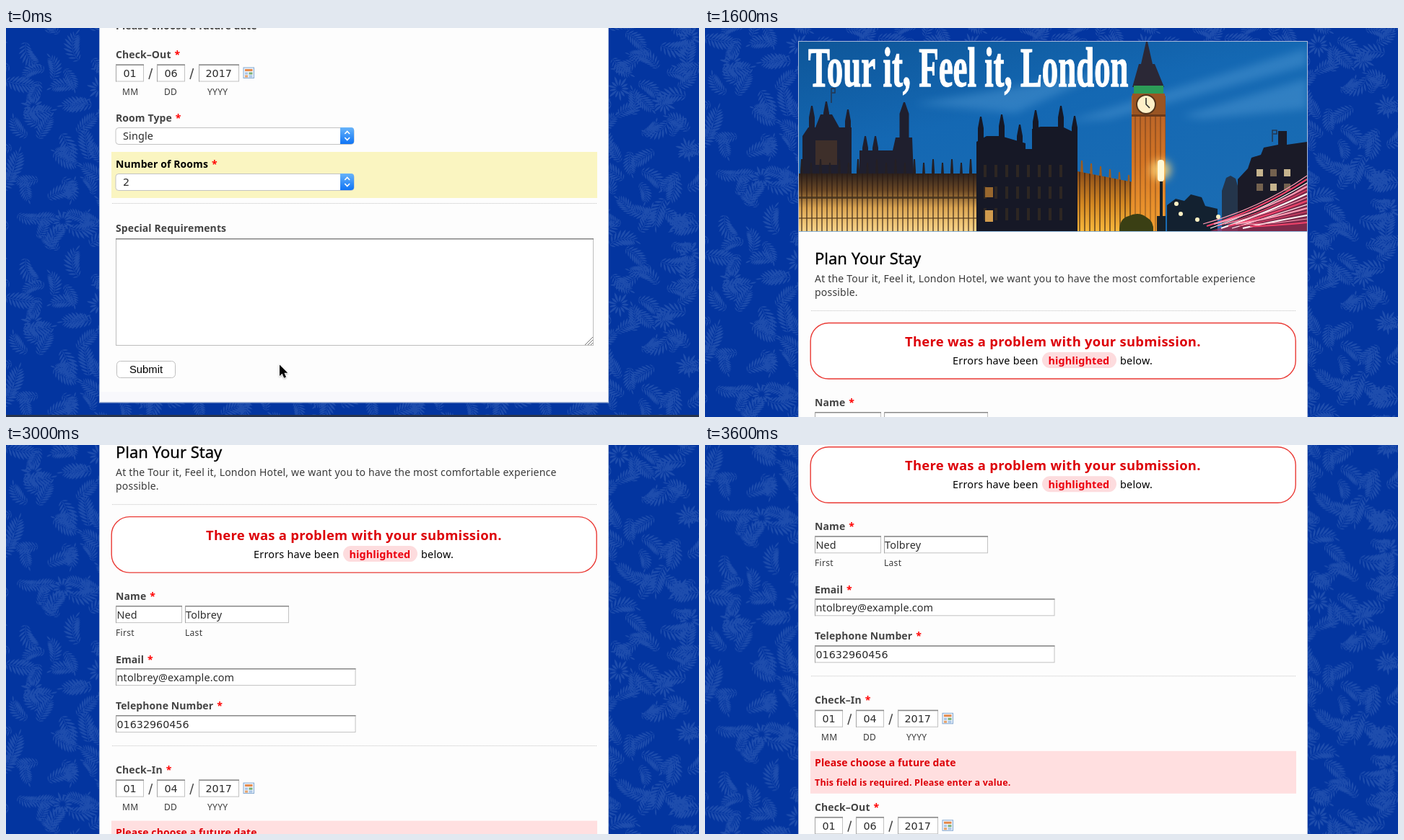
Animation, 960 px wide and 540 px high, one loop 4.8 s. Source, as an HTML page:

```html
<!DOCTYPE html>
<html lang="en">
<head>
<meta charset="utf-8">
<title>Plan Your Stay</title>
<style>
html, body { margin: 0; width: 100%; height: 100%; overflow: hidden; background: #0335a0; }
svg { display: block; }
text { font: 14px "Noto Sans", "Open Sans", sans-serif; letter-spacing: .2px; fill: #3a3a3a; white-space: pre; }
.label { font-weight: bold; letter-spacing: .1px; fill: #444; }
.dark { fill: #000; }
.req { fill: #f00; }
.title { font-size: 22px; letter-spacing: 0; fill: #000; stroke: #000; stroke-width: .3px; }
.value { font-size: 14.4px; letter-spacing: .15px; fill: #2c2c2c; }
.num { font: 14.3px "DejaVu Sans", sans-serif; letter-spacing: 0; }
.small { font-size: 12px; letter-spacing: .3px; }
.alert { font-size: 18.4px; font-weight: bold; letter-spacing: .28px; fill: #dd0008; }
.note { font-size: 14.4px; letter-spacing: .22px; fill: #000; }
.hot { font-weight: bold; letter-spacing: .1px; fill: #ec0010; }
.err { font-weight: bold; letter-spacing: .1px; fill: #dd0008; }
.err.fine { font-size: 12.5px; letter-spacing: .2px; }
.banner { font: bold 78px "Liberation Serif", serif; letter-spacing: 0; fill: #fff; stroke: #fff; stroke-width: 1.4px; }
.press { font: 14.8px "Liberation Sans", sans-serif; letter-spacing: 0; fill: #000; }
.rule { stroke: #c4c4c4; stroke-dasharray: 1 1; }
</style>
</head>
<body>
<svg id="stage" width="960" height="540" viewBox="0 0 960 540"></svg>
<script>
const FPS = 15, LOOP = 4800;
const PRESS = 14, RELEASE = 21, RESULT = 24, SCROLL = 39;

let seed = 11;
const rand = () => (seed = seed * 16807 % 2147483647) / 2147483647;
const range = (n, f) => Array.from({ length: n }, (_, i) => f(i)).join('');
const rect = (x, y, w, h, fill, more = '') =>
  `<rect x="${x}" y="${y}" width="${w}" height="${h}" fill="${fill}" ${more}/>`;
const path = (d, fill, more = '') => `<path d="${d}" fill="${fill}" ${more}/>`;
const text = (x, y, cls, str, more = '') => `<text x="${x}" y="${y}" class="${cls}" ${more}>${str}</text>`;
const label = (y, str, cls = '', star = true) =>
  text(152, y, 'label ' + cls, str + (star ? '<tspan class="req" dx="5">*</tspan>' : ''));
const rule = y => `<path class="rule" d="M147 ${y}H819"/>`;
const gradient = (id, stops, dir = 'x2="0" y2="1"') => `<linearGradient id="${id}" ${dir}>` +
  stops.map(([o, c]) => `<stop offset="${o}" stop-color="${c}"/>`).join('') + '</linearGradient>';

// ---- wallpaper ----
const W = 240, H = 300, CELL = 30;
function leaf(x, y, a, len, fat) {
  const p = (d, s) => `${(x + Math.cos(a) * d - Math.sin(a) * s).toFixed(1)} ${(y + Math.sin(a) * d + Math.cos(a) * s).toFixed(1)}`;
  return `M${p(0, 0)}Q${p(len * .6, fat)} ${p(len, 0)}Q${p(len * .5, -fat)} ${p(0, 0)}`;
}
function frond(x, y, a, size, bend) {
  let d = '';
  const n = 9;
  for (let k = 0; k < n; k++) {
    const len = size * (.14 + .26 * Math.sin((k + 1) / (n + 1) * Math.PI));
    for (const side of [-1, 1]) d += leaf(x, y, a + side * (1.05 - k * .05), len, len * .2);
    d += leaf(x, y, a, size / n * 1.4, 1);
    x += Math.cos(a) * size / n;
    y += Math.sin(a) * size / n;
    a += bend / n;
  }
  return d + leaf(x, y, a, size * .25, 2);
}
function bloom(x, y, r) {
  return range(13, i => {
    const a = i * Math.PI * 2 / 13;
    return leaf(x + Math.cos(a) * r * .2, y + Math.sin(a) * r * .2, a, r * (.6 + .25 * (i % 2)), 3);
  });
}
function wallpaper() {
  let d = '';
  for (let y = 0; y < H; y += CELL) for (let x = 0; x < W; x += CELL) {
    const px = x + rand() * CELL, py = y + rand() * CELL;
    d += rand() < .12 ? bloom(px, py, 17)
      : frond(px, py, rand() * 6.28, 27 + rand() * 14, rand() * 3 - 1.5);
  }
  const copies = range(9, i => `<use href="#foliage" x="${(i % 3 - 1) * W}" y="${(Math.floor(i / 3) - 1) * H}"/>`);
  return `<path id="foliage" d="${d}" fill="#1e4dad"/>
    <pattern id="paper" width="${W}" height="${H}" patternUnits="userSpaceOnUse">
    ${rect(0, 0, W, H, '#0335a0')}${copies}</pattern>`;
}

// ---- form parts ----
const field = (x, y, w, h = 24) => rect(x + .5, y + .5, w - 1, h - 1, '#fff', 'stroke="#c2c2c2"') +
  path(`M${x} ${y + .75}h${w}`, 'none', 'stroke="#8a8a8a" stroke-width="1.5"') +
  path(`M${x + .5} ${y}v${h}`, 'none', 'stroke="#a5a5a5"');

function select(y, value, cls) {
  return rect(152, y + .5, 330, 23, '#fff', 'rx="4" stroke="#c3c3c3"') +
    path(`M463 ${y}h15a4 4 0 0 1 4 4v15a4 4 0 0 1-4 4h-15z`, 'url(#blue)') +
    path(`M469.3 ${y + 9}l3.4-3.6 3.4 3.6M469.3 ${y + 14}l3.4 3.6 3.4-3.6`, 'none', 'stroke="#fff" stroke-width="1.6"') +
    text(162, y + 17.3, cls, value);
}

function dates(y, name, day) {
  const box = (x, w, tx, value, lx, unit) => field(x, 8.5, w) + text(tx, 26, 'value num', value) + text(lx, 50.5, 'small', unit);
  return `<g transform="translate(0 ${y})">${label(0, name)}
    ${box(152, 39, 162.5, '01', 161, 'MM')}${box(209, 39, 219.5, day, 219, 'DD')}${box(267, 56, 276.5, '2017', 279, 'YYYY')}
    ${[[203, 197], [260, 254]].map(([a, b]) => path(`M${a - .5} 14L${b + 1} 29`, 'none', 'stroke="#444" stroke-width="1.5"')).join('')}
    ${rect(329, 13, 14.5, 14.5, '#edf3fb', 'stroke="#84a9d2"')}${rect(331, 15, 10.5, 3, '#e58a4a')}
    ${rect(331, 19.5, 4, 3, '#a9c6e6')}${rect(336.5, 19.5, 5, 3, '#7cb078')}
    ${rect(331, 23.5, 4, 3, '#e5a36c')}${rect(336.5, 23.5, 5, 3, '#a9c6e6')}</g>`;
}

// ---- header picture ----
const spire = (x, top, base, w = 8) =>
  `M${x - w / 2} ${base}V${top + 16}L${x - 1} ${top}h2L${x + w / 2} ${top + 16}V${base}z`;

function picture() {
  const west = [[148, 108], [168, 102], [198, 113]].map(([x, y]) => spire(x, y, 205)).join('') +
    'M135 205V150l8-12h10l7-18h16l10 18h17v67z' + [[222, 150], [236, 150]].map(([x, y]) => spire(x, y, 205)).join('') +
    spire(276, 103, 205, 13) + 'M214 205V170h46l4-18h23l2 53z';
  const block = [[382, 123], [411, 120], [436, 134], [458, 114], [493, 108], [512, 122]]
    .map(([x, y]) => spire(x, y, 282)).join('') + 'M376 282V158l14-8h20l34 10v8h9v-28l12-3h30l21 10V282z';
  const tower = rect(591, 94, 47, 188, 'url(#tower)') + rect(591, 94, 47, 188, 'url(#bars)', 'opacity=".5"') +
    path('M592 82L601 50h3l7-31h2l7 31h3l13 32z', '#2b2836') + rect(594, 80, 41, 11, '#2c9c58') +
    rect(592, 91, 45, 29, '#9a5523') + `<circle cx="611" cy="106" r="13" fill="#fff0c8" stroke="#54351c" stroke-width="2"/>` +
    path('M611 97v9l5 5', 'none', 'stroke="#222" stroke-width="1.5"') + rect(591, 120, 47, 3, '#6c3a1a');
  const trails = range(14, i => path(`M${690 + i * 5} ${272 + i % 3 * 3}Q770 ${250 + i * 2} 834 ${205 + i * 5}`, 'none',
    `stroke="${['#ff9db4', '#f0426a', '#fff3f3'][i % 3]}" stroke-width="${1.2 + i % 2}"`));
  return `<g clip-path="url(#frame)">
    ${rect(130, 19, 704, 264, 'url(#sky)')}
    <g filter="url(#soft)" fill="#6fb3e6" opacity=".3"><path d="M500 130L834 28V52L560 126zM660 122L834 70V112L690 126zM290 105L560 60 430 118z"/></g>
    ${path(west, '#1f1f2e')}${rect(153, 156, 30, 34, '#6b4624', 'opacity=".4"')}
    ${path(range(19, i => spire(134 + i * 13, 182 + i % 2 * 5, 215, 4)), '#241f24')}
    ${rect(130, 202, 246, 80, 'url(#gold)')}${rect(130, 202, 246, 80, 'url(#bars)')}
    ${rect(130, 234, 246, 3, '#44311d', 'opacity=".8"')}${rect(130, 263, 246, 2, '#573b1b', 'opacity=".6"')}
    ${path(block, '#161826')}${range(3, r => range(8, c => rect(386 + c * 15, 190 + r * 30, 4, 17, '#2d2622')))}
    ${rect(388, 221, 11, 14, '#98672e')}${rect(388, 253, 11, 16, '#d19b4d')}
    ${path(range(6, i => spire(522 + i * 13, 184 + i * 4, 220, 4)), '#9a5c20')}
    ${path('M516 199L593 214V282H516z', 'url(#amber)')}${path('M516 199L593 214V282H516z', 'url(#bars)')}
    ${tower}
    ${path('M574 282q0-18 13-21 14-7 25 2 10 5 9 19z', '#3a3f14')}
    ${path('M640 282V246l12-9 12 3 9-9 15 4 5 12 17 4v31z', '#132130')}
    ${path('M716 282V226l6-18 6-3 7 4 6 20v53z', '#24354b')}
    ${path('M738 282V210l14-15 5-15 13-4 4-10 20-4V143h12v19l28-4V282z', '#1a1a27')}
    ${range(6, i => rect(764 + i % 3 * 19, 196 + Math.floor(i / 3) * 20, 9, 10, i % 2 ? '#74624f' : '#c6b48e'))}
    ${path('M175 104V84h5v6h-4M786 158V142h6v5h-5', 'none', 'stroke="#26364e" stroke-width="1.5"')}
    ${path('M700 282Q780 256 834 215V282z', '#b3335c', 'opacity=".65"')}${trails}
    <g filter="url(#soft)"><circle cx="631" cy="197" r="14" fill="#ffd779" opacity=".85"/></g>
    ${rect(627, 183, 9, 30, '#fff8d4', 'rx="4"')}${rect(630, 213, 4, 69, '#172027')}${rect(626, 261, 12, 21, '#172027')}
    ${[[653, 244], [659, 258], [682, 266], [711, 262]].map(([x, y]) => `<circle cx="${x}" cy="${y}" r="3" fill="#fff1c4"/>`).join('')}
    </g>${text(0, 0, 'banner', 'Tour it, Feel it, London', 'transform="translate(143 80.5) scale(.575 1)"')}`;
}

// ---- the two pages ----
const bookingPage = `<g id="booking">
  <g transform="translate(0 60)">${rect(0, -60, 960, 600, 'url(#paper)')}</g>
  ${rect(129, -5, 706, 525.5, '#a9b9d8')}${rect(130, -5, 704, 524, '#fdfdfd')}${rect(130, 505, 704, 14, '#f8f8fc')}
  ${rect(0, 537, 960, 3, '#27344d')}
  ${label(2, 'Please choose a future date', '', false)}
  ${dates(42, 'Check–Out', '06')}
  ${label(129.5, 'Room Type')}${select(138, 'Single', 'value')}
  ${rect(146, 172, 673, 64, '#faf5c1')}
  ${label(193.5, 'Number of Rooms', 'dark')}${select(202, '2', 'value num')}
  ${rule(243.5)}
  ${label(282.5, 'Special Requirements', '', false)}
  ${rect(152.5, 292.5, 661, 148, '#fff', 'stroke="#bdbdbd"')}
  ${path('M152 292.8H814', 'none', 'stroke="#858585" stroke-width="1.6"')}
  ${path('M802 440l11-11M806 440l7-7M810 440l3-3', 'none', 'stroke="#777"')}
  <rect id="button" x="153.5" y="462.5" width="81" height="23" rx="5" stroke="#bfbfbf"/>
  <text id="caption" x="171" y="479" class="press">Submit</text>
  <path id="cursor" d="M0 0V15.5L3.6 12.2 6.2 18.2 9 17 6.4 11.2H11.2z" fill="#000" stroke="#fff" stroke-width="1.2" paint-order="stroke" filter="url(#shade)"/>
</g>`;

const resultPage = `<g id="result">
  ${rect(0, 0, 960, 1000, 'url(#paper)')}
  ${rect(129, 18, 706, 990, '#a9b9d8')}${rect(130, 19, 704, 990, '#fdfdfd')}
  ${picture()}
  ${text(152, 328, 'title', 'Plan Your Stay')}
  ${text(152, 353, '', 'At the Tour it, Feel it, London Hotel, we want you to have the most comfortable experience')}
  ${text(152, 372, '', 'possible.')}
  ${rule(392.5)}
  ${rect(146.2, 409.5, 672, 77.5, '#fff', 'rx="25" stroke="#ea3a35" stroke-width="1.4"')}
  ${text(277, 442, 'alert', 'There was a problem with your submission.')}
  ${text(343, 466.5, 'note', 'Errors have been')}
  ${rect(467, 450, 103, 22, '#fddcde', 'rx="11"')}
  ${text(475.5, 466.5, 'note hot', 'highlighted')}${text(575, 466.5, 'note', 'below.')}
  ${label(524.5, 'Name')}${field(152, 533, 92)}${field(248, 533, 144)}
  ${text(153.5, 550.5, 'value', 'Ned')}${text(249, 550.5, 'value', 'Tolbrey')}
  ${text(152, 575, 'small', 'First')}${text(248, 575, 'small', 'Last')}
  ${label(612.5, 'Email')}${field(152, 620, 332.5)}${text(153.5, 637.5, 'value', 'ntolbrey@example.com')}
  ${label(676.5, 'Telephone Number')}${field(152, 685, 332.5)}${text(153.5, 702.5, 'value num', '01632960456')}
  ${rule(727.5)}
  ${dates(766, 'Check–In', '04')}
  ${rect(146, 831.5, 673, 59, '#ffdfe0')}
  ${text(152, 853, 'err', 'Please choose a future date')}
  ${text(152, 879.5, 'err fine', 'This field is required. Please enter a value.')}
  ${dates(914.5, 'Check–Out', '06')}
</g>`;

const $ = id => document.getElementById(id);
$('stage').innerHTML = `<defs>${wallpaper()}
  ${gradient('blue', [[0, '#68b4fa'], [1, '#0f74f5']])}
  ${gradient('sky', [[0, '#0e5699'], [.45, '#1468b3'], [1, '#1a6cb3']], 'x2=".6" y2="1"')}
  ${gradient('gold', [[0, '#2c211c'], [.3, '#6c4925'], [.6, '#dca652'], [1, '#f8d58a']])}
  ${gradient('amber', [[0, '#8a4c18'], [.55, '#d48822'], [1, '#f8b83c']])}
  ${gradient('tower', [[0, '#b3602a'], [.5, '#d47524'], [1, '#f4a030']])}
  <pattern id="bars" width="7" height="90" patternUnits="userSpaceOnUse">${rect(0, 0, 2, 90, '#2b1a12', 'opacity=".55"')}</pattern>
  <clipPath id="frame"><rect x="130" y="19" width="704" height="263.5"/></clipPath>
  <filter id="soft" x="-50%" y="-50%" width="200%" height="200%"><feGaussianBlur stdDeviation="6"/></filter>
  <filter id="shade" x="-50%" y="-50%" width="200%" height="200%"><feDropShadow dx="0" dy="1" stdDeviation=".8" flood-opacity=".35"/></filter>
  </defs>${bookingPage}${resultPage}`;

// A quick flick, then friction slows the page towards its resting place.
const flick = [0, 11, 68, 145, 215];
const scrollAt = i => i <= 0 ? 0 : i <= 4 ? flick[i] : 412 - 197 * .72 ** (Math.min(i, 15) - 4);
const ease = p => p * p * (3 - 2 * p);

function draw(n) {
  const done = n >= RESULT, pressed = n >= PRESS && n < RELEASE, p = ease(Math.min(n / 7, 1));
  $('booking').style.display = done ? 'none' : '';
  $('result').style.display = done ? '' : 'none';
  $('result').setAttribute('transform', `translate(0 ${-scrollAt(n - SCROLL)})`);
  $('cursor').setAttribute('transform', `translate(${379 - 185.5 * p} ${467.5 + 9 * p})`);
  $('button').setAttribute('fill', pressed ? 'url(#blue)' : '#fff');
  $('button').setAttribute('stroke', pressed ? '#2c7fe6' : '#bfbfbf');
  $('caption').style.fill = pressed ? '#fff' : '#000';
}

let start, shown = 0;
draw(0);
requestAnimationFrame(function tick(now) {
  start ??= now;
  // The small lead puts each step on the 10 ms mark before its 1/15 s tick.
  const n = Math.floor(((now - start) % LOOP + 6.8) * FPS / 1000) % (LOOP * FPS / 1000);
  if (n !== shown) draw(shown = n);
  requestAnimationFrame(tick);
});
</script>
</body>
</html>
```
